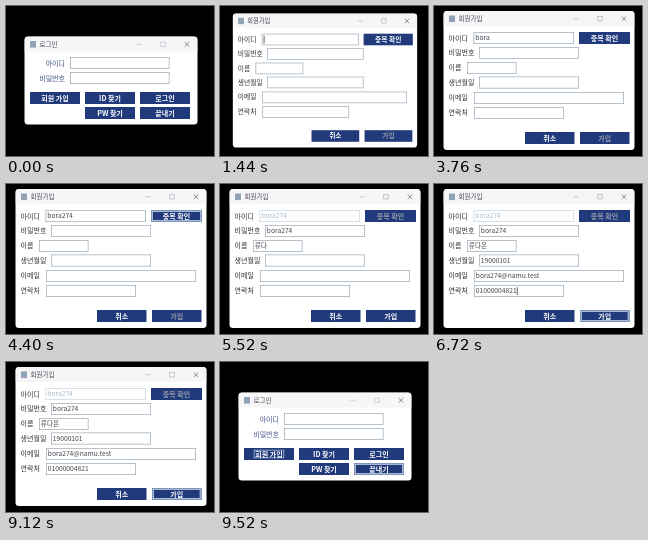
These frames come from a looping animation (208 by 150 pixels, 9.6 s). An HTML page with a canvas:

```html
<!DOCTYPE html>
<html lang="ko">
<head>
<meta charset="utf-8">
<title>회원가입</title>
<style>
  html, body { margin: 0; width: 100%; height: 100%; overflow: hidden; background: #000; }
  canvas { display: block; width: 208px; height: 150px; }
</style>
</head>
<body>
<canvas id="stage"></canvas>
<script>
const LOOP = 9600, STEP = 80, W = 208, H = 150;
const FONT = '"Noto Sans CJK KR", "Noto Sans CJK", "Noto Sans", sans-serif';
const NAVY = '#213a7c', INK = '#303038', EDGE = '#9aa9b8';

// Message boxes: opening time, closing time and text.
const MESSAGES = [
  [3040, 3600, '이미 있는 아이디입니다.'],
  [4480, 4960, '사용 가능한 아이디입니다.'],
  [7280, 9040, '회원가입이 완료되었습니다.']
];

const canvas = document.getElementById('stage');
const ctx = canvas.getContext('2d');
const dpr = window.devicePixelRatio || 1;
canvas.width = W * dpr;
canvas.height = H * dpr;

const clamp = v => Math.max(0, Math.min(1, v));
const span = (t, from, to) => clamp((t - from) / (to - from));
const easeOut = p => 1 - (1 - p) ** 3;
const typed = (s, t, from, to) => s.slice(0, Math.floor(span(t, from, to) * s.length));

function rect(x, y, w, h, color) {
  ctx.fillStyle = color;
  ctx.fillRect(x, y, w, h);
}

function frame(x, y, w, h, color, line = 0.7) {
  ctx.strokeStyle = color;
  ctx.lineWidth = line;
  ctx.strokeRect(x + line / 2, y + line / 2, w - line, h - line);
}

function text(s, x, y, { size = 6.8, weight = 400, color = INK, align = 'left' } = {}) {
  ctx.font = `${weight} ${size}px ${FONT}`;
  ctx.fillStyle = color;
  ctx.textAlign = align;
  ctx.textBaseline = 'alphabetic';
  ctx.fillText(s, x, y + size * 0.36);
  return ctx.measureText(s).width;
}

function stroke(color, line, ...segments) {
  ctx.strokeStyle = color;
  ctx.lineWidth = line;
  ctx.beginPath();
  for (const [x1, y1, x2, y2] of segments) {
    ctx.moveTo(x1, y1);
    ctx.lineTo(x2, y2);
  }
  ctx.stroke();
}

function cross(x, y, color) {
  stroke(color, 0.6, [x - 2.3, y - 2.3, x + 2.3, y + 2.3], [x - 2.3, y + 2.3, x + 2.3, y - 2.3]);
}

function panel(x, y, w, h, bar, body) {
  ctx.save();
  ctx.beginPath();
  ctx.roundRect(x, y, w, h, 3.5);
  ctx.shadowColor = 'rgba(0, 0, 0, 0.5)';
  ctx.shadowBlur = 22 * dpr;
  ctx.shadowOffsetY = 6 * dpr;
  ctx.fillStyle = body;
  ctx.fill();
  ctx.shadowColor = 'transparent';
  ctx.clip();
  rect(x, y, w, bar, '#f6f5f8');
  ctx.restore();
}

function windowBox(x, y, w, h, title, active, faint) {
  panel(x, y, w, h, 15, '#fff');
  const cy = y + 7.8, right = x + w - 10.5;
  const ink = active ? '#45454c' : '#a2a2a8';
  rect(x + 5.5, cy - 3.3, 6, 6.6, '#8fa2b6');
  text(title, x + 15, cy, { size: 6.5, color: ink });
  stroke(faint, 0.6, [right - 50.5, cy, right - 45.5, cy]);
  frame(right - 26.5, cy - 2.5, 5, 5, faint, 0.6);
  cross(right, cy, ink);
}

function label(s, x, y, align, color) {
  text(s, x, y, { size: 7, weight: 500, align, color });
}

function field(x, y, w, value = '', { caret = false, off = false } = {}) {
  rect(x, y, w, 12, '#fff');
  frame(x, y, w, 12, off ? '#c6d3df' : EDGE);
  const width = text(value, x + 1.8, y + 6, { size: 6.7, color: off ? '#a9bccd' : '#44444a' });
  if (caret) rect(x + 2 + width, y + 2, 0.7, 8, '#222');
}

function button(s, x, y, w, { off = false, hover = false, focus = false } = {}) {
  rect(x, y, w, 12, NAVY);
  if (hover) {
    frame(x, y, w, 12, '#8297b8', 0.8);
    frame(x + 0.8, y + 0.8, w - 1.6, 10.4, '#c9d7e8', 1);
  }
  const width = text(s, x + w / 2, y + 6,
    { size: 7, weight: 700, color: off ? '#969baa' : '#fff', align: 'center' });
  if (focus) frame(x + (w - width) / 2 - 1.5, y + 1.8, width + 3, 8.4, '#c5d2e6', 0.7);
}

function login(t) {
  windowBox(18.5, 30.5, 173, 88, '로그인', true, '#b7b7bd');
  label('아이디', 59, 57, 'right', '#45548a');
  label('비밀번호', 59, 72, 'right', '#45548a');
  field(64, 51, 99.5);
  field(64, 66, 99.5);
  button('회원 가입', 24, 86, 50, { focus: t >= 960, hover: t >= 960 && t < 1440 });
  button('ID 찾기', 79, 86, 50);
  button('로그인', 134, 86, 50);
  button('PW 찾기', 79, 101, 50);
  button('끝내기', 134, 101, 50, { hover: t >= 9440 });
}

function signup(t) {
  const active = !MESSAGES.some(([from, to]) => t >= from && t < to);
  const checked = t >= 4960;
  const id = typed('bora', t, 2080, 2560) + typed('274', t, 3680, 4160);
  const blink = Math.floor(t / 560) % 2 === 0;
  const lit = (from, to) => ({ caret: t >= from && t < to && blink });

  windowBox(9.5, 5, 191, 139, '회원가입', active, '#a3a3aa');
  const labels = ['아이디', '비밀번호', '이름', '생년월일', '이메일', '연락처'];
  labels.forEach((s, i) => label(s, 14.6, 32 + i * 14.9));

  field(39.5, 26, 100.5, id, { caret: t < 2080 || lit(2080, 2640).caret, off: checked });
  field(45, 41, 100, typed('bora274', t, 4960, 5280), lit(4960, 5280));
  field(33, 56, 49.5, typed('류다온', t, 5280, 5600), lit(5280, 5600));
  field(45, 70.5, 100, typed('19000101', t, 5600, 5920), lit(5600, 5920));
  field(40, 86, 150, typed('bora274@namu.test', t, 5920, 6320), lit(5920, 6320));
  field(40, 101, 90, typed('01000004821', t, 6320, 6640), { caret: t >= 6320 && t < 7200 });

  const checking = (t >= 2880 && t < 3680) || (t >= 4240 && !checked);
  button('중복 확인', 145, 26, 51, { off: checked, hover: checking });
  button('취소', 91, 126, 49.5);
  button('가입', 146, 126, 49.5, { off: !checked, hover: t >= 6640 });
}

function message(s) {
  panel(39, 45.5, 131.5, 59.5, 12.5, '#f0f0f0');
  text('메시지', 44, 52, { size: 6.5 });
  cross(161.5, 52, '#55555c');

  const glow = ctx.createRadialGradient(50, 68, 1, 52, 71, 7);
  glow.addColorStop(0, '#f0f0fb');
  glow.addColorStop(1, '#9b9dca');
  ctx.fillStyle = glow;
  ctx.beginPath();
  ctx.arc(52, 71, 6.3, 0, Math.PI * 2);
  ctx.fill();
  text('i', 52, 71, { size: 9.5, weight: 700, color: '#3d4290', align: 'center' });

  text(s, 67.5, 70.8, { size: 7, weight: 500 });
  const shine = ctx.createLinearGradient(0, 84.5, 0, 97.5);
  shine.addColorStop(0, '#e2ebf4');
  shine.addColorStop(0.35, '#fff');
  shine.addColorStop(1, '#bccfe1');
  rect(93, 84.5, 25, 13, shine);
  frame(93, 84.5, 25, 13, '#7a8a99');
  text('확인', 105.5, 91, { size: 6.9, weight: 500, align: 'center' });
  frame(97.5, 86.7, 16, 8.6, '#a3b8cc', 0.6);
}

// Scales and fades a window about the middle of the form.
function zoom(scale, alpha, draw) {
  if (alpha <= 0) return;
  const cx = 104.8, cy = 74.8;
  ctx.save();
  ctx.globalAlpha = alpha;
  ctx.translate(cx, cy);
  ctx.scale(scale, scale);
  ctx.translate(-cx, -cy);
  draw();
  ctx.restore();
}

// Quick pop in and out, as the desktop does it.
function pop(t, from, to, draw) {
  const open = span(t, from - 40, from + 200);
  const close = span(t, to - 80, to + 80);
  const scale = 0.72 + 0.28 * easeOut(open) - 0.1 * close;
  zoom(scale, clamp(open * 2.5) * (1 - close), draw);
}

function render(t) {
  ctx.setTransform(dpr, 0, 0, dpr, 0, 0);
  rect(0, 0, W, H, '#000');
  login(t);
  pop(t, 1360, 9200, () => signup(t));
  for (const [from, to, s] of MESSAGES) pop(t, from, to, () => message(s));
}

function tick(now) {
  render(Math.floor((now % LOOP) / STEP) * STEP);
  requestAnimationFrame(tick);
}
requestAnimationFrame(tick);
</script>
</body>
</html>
```
